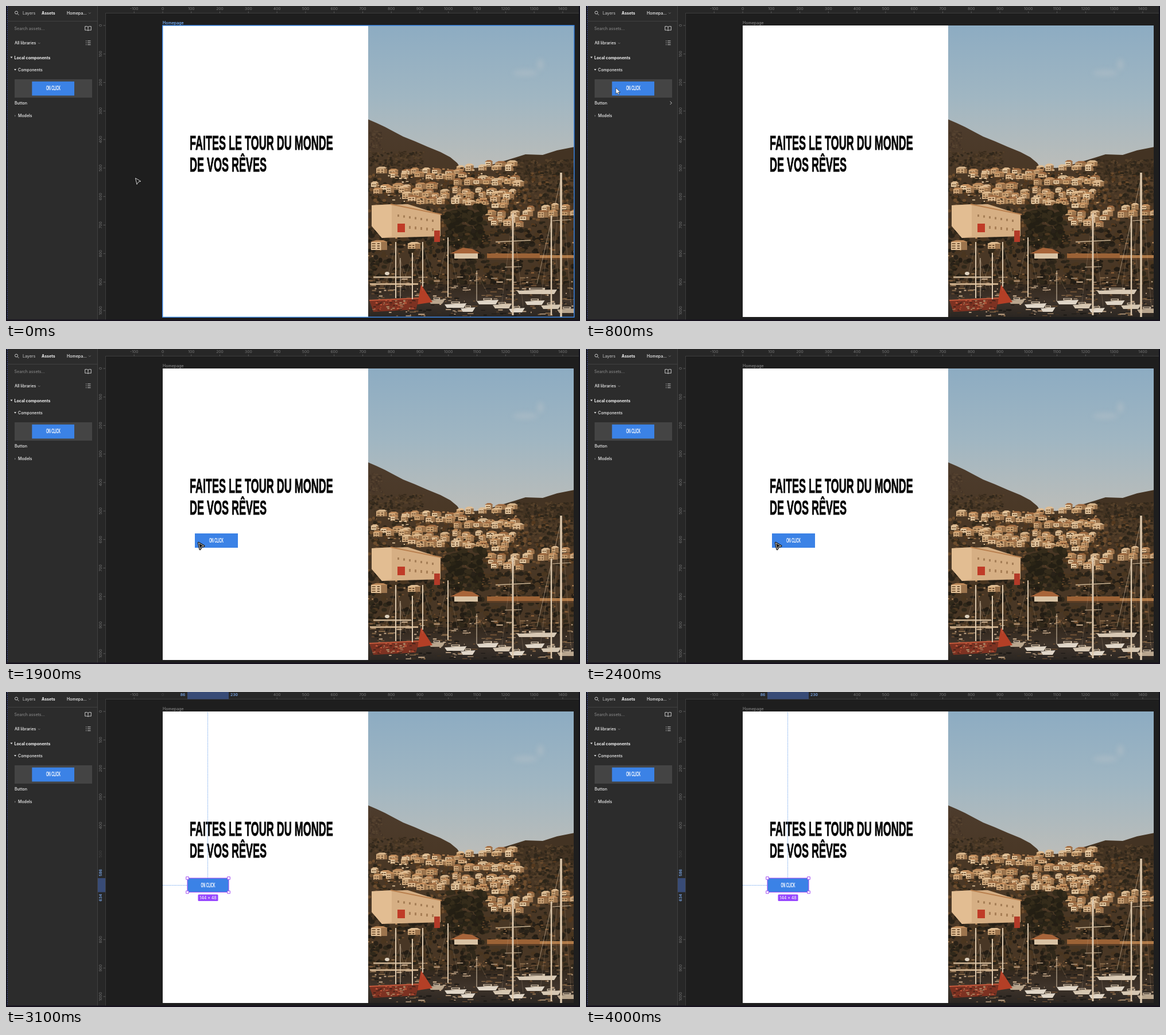
An HTML page with a canvas that plays this animation: 1000x550 px, repeating every 4300 ms.

```html
<!DOCTYPE html>
<html lang="fr">
<head>
<meta charset="utf-8">
<title>Homepage</title>
<style>
html, body { margin: 0; width: 100%; height: 100%; overflow: hidden; background: #1e1e1e; }
canvas, svg { position: absolute; left: 0; top: 0; }
canvas { left: 631px; top: 34px; }
text { font: 500 7px Inter, sans-serif; fill: #f4f4f4; }
.bold { font-weight: 700; }
.mute { fill: #808080; }
.ruler text { font-size: 6.7px; font-weight: 400; fill: #747474; text-anchor: middle; }
.ruler .hot { fill: #78a5e6; font-weight: 600; }
.ruler .dim { fill: #454545; }
.ruler path { stroke: #5a5a5a; }
.line { fill: none; stroke: #d8d8d8; stroke-width: .9; }
.title { font: 700 34.5px "Liberation Sans", Arial, sans-serif; fill: #050505; stroke: #050505; stroke-width: .9; }
.cta { font: 700 10.8px "Liberation Sans", Arial, sans-serif; fill: #fff; text-anchor: middle; }

.hover, .before, .after, .chev, .ghost, .cursor, .white, .dark { animation: 4.3s step-end infinite; }
.hover { animation-name: hover; }
.before { animation-name: before; }
.after { animation-name: after; }
.chev { animation-name: chev; }
.ghost { animation-name: ghost; }
.cursor { animation-name: cursor; }
.white { animation-name: white; }
.dark { animation-name: dark; }
@keyframes hover { 0% { opacity: 1 } 2.32%, to { opacity: 0 } }
@keyframes before { 0% { opacity: 1 } 67.43%, to { opacity: 0 } }
@keyframes after { 0% { opacity: 0 } 67.43%, to { opacity: 1 } }
@keyframes chev { 0% { opacity: 0 } 11.62% { opacity: 1 } 23.25%, to { opacity: 0 } }
@keyframes white { 0% { opacity: 0 } 4.65% { opacity: 1 } 25.58%, to { opacity: 0 } }
@keyframes dark { 0% { opacity: 1 } 4.65% { opacity: 0 } 25.58%, to { opacity: 1 } }
@keyframes ghost {
  0% { opacity: 0; transform: translate(45px, 132px) }
  23.25% { opacity: 1; transform: translate(62px, 146px) }
  25.58% { opacity: 1; transform: translate(152px, 226px) }
  27.9% { opacity: 1; transform: translate(250px, 307px); animation-timing-function: steps(3) }
  34.88% { opacity: 1; transform: translate(310px, 328px); animation-timing-function: steps(4) }
  44.18% { opacity: 1; transform: translate(329px, 322px); animation-timing-function: steps(6) }
  58.13% { opacity: 1; transform: translate(323px, 322px) }
  67.43%, to { opacity: 0; transform: translate(323px, 322px) }
}
@keyframes cursor {
  0% { opacity: 1; transform: translate(225px, 300px); animation-timing-function: steps(3) }
  6.97% { opacity: 1; transform: translate(128px, 214px); animation-timing-function: steps(5) }
  18.6% { opacity: 1; transform: translate(52px, 143px) }
  20.92% { opacity: 1; transform: translate(58px, 150px) }
  23.25% { opacity: 1; transform: translate(120px, 205px) }
  25.58% { opacity: 1; transform: translate(205px, 282px) }
  27.9% { opacity: 1; transform: translate(278px, 338px); animation-timing-function: steps(3) }
  34.88% { opacity: 1; transform: translate(322px, 350px); animation-timing-function: steps(4) }
  44.18% { opacity: 1; transform: translate(335px, 338px); animation-timing-function: steps(6) }
  58.13% { opacity: 1; transform: translate(329px, 338px) }
  67.43% { opacity: 1; transform: translate(328px, 338px) }
  69.76%, to { opacity: 0; transform: translate(328px, 338px) }
}
</style>
</head>
<body>
<canvas id="photo" width="358" height="509"></canvas>
<svg width="1000" height="550" viewBox="0 0 1000 550">
  <defs>
    <g id="label"><g transform="scale(.48 1)"><text class="cta">ON CLICK</text></g></g>
    <g id="btn">
      <rect width="75" height="25" fill="#3b82e6"/>
      <use href="#label" x="37.5" y="16.3"/>
    </g>
  </defs>

  <!-- page -->
  <rect x="273" y="34" width="358" height="509" fill="#fff"/>
  <g transform="translate(320 251.2) scale(.522 1)">
    <text class="title">FAITES LE TOUR DU MONDE</text>
    <text class="title" y="38">DE VOS RÊVES</text>
  </g>
  <text class="mute" x="273" y="32">Homepage</text>
  <g class="hover">
    <rect x="272.8" y="34" width="717" height="509.3" fill="none" stroke="#3f8df0" stroke-width="1.4"/>
    <text x="273" y="32" style="fill:#5b9df0">Homepage</text>
  </g>

  <!-- rulers -->
  <path d="M159 0H1000V12.5H173V550H159Z" fill="#272727"/>
  <path d="M173 12.5H1000M173.5 12V550" stroke="#3d3d3d" fill="none"/>
  <g class="ruler" id="rulers"></g>
  <g class="ruler after">
    <path d="M316 0h72v12.5h-72zM159.5 325h13.5v24.5h-13.5z" fill="#384b76" style="stroke:none"/>
    <text class="hot" x="308" y="6.5">86</text>
    <text class="hot" x="397.5" y="6.5">230</text>
    <text class="hot" transform="translate(166.5 315.5) rotate(-90)">586</text>
    <text class="hot" transform="translate(166.5 359) rotate(-90)">634</text>
    <text class="dim" x="273" y="6.5">0</text>
    <text class="dim" transform="translate(166.5 283) rotate(-90)">500</text>
  </g>

  <!-- sidebar -->
  <rect x="3" width="156" height="550" fill="#2c2c2c"/>
  <path d="M3 26.5H159M159.5 0V550" stroke="#414141"/>
  <g class="line">
    <circle cx="18" cy="11.5" r="2.5"/>
    <path d="M20 13.5l2.4 2.4M143 36.5q-2.5-1.8-5.3-.8v6.5q3-.8 5.3.8q2.3-1.6 5.3-.8v-6.5q-2.8-1-5.3.8v6.5"/>
    <path d="M139 61h1.3M142 61h5.5M139 64.3h1.3M142 64.3h5.5M139 67.6h1.3M142 67.6h5.5"/>
    <path d="M144 11.5l1.8 1.8 1.8-1.8M56 64l1.8 1.8 1.8-1.8" stroke="#777"/>
    <path class="chev" d="M146.500 166.500l2.800 2.800-2.800 2.800"/>
  </g>
  <path d="M7.500 88.500h4l-2 2.800zM14 110h4l-2 2.800z" fill="#ddd"/>
  <path d="M15 190l2 1.700-2 1.700z" fill="#777"/>
  <text x="29" y="15" style="fill:#b5b5b5">Layers</text>
  <text class="bold" x="62" y="15">Assets</text>
  <text x="106" y="15">Homepa...</text>
  <text class="mute" x="14.5" y="41.5">Search assets...</text>
  <text x="15" y="67">All libraries</text>
  <text class="bold" x="14.5" y="92.5">Local components</text>
  <text x="21" y="113.5">Components</text>
  <rect x="15" y="128" width="135" height="32" fill="#444"/>
  <rect x="45.3" y="131.8" width="73.7" height="24.6" fill="#3b82e6"/>
  <use href="#label" x="82.5" y="147.3"/>
  <text x="15" y="171.8">Button</text>
  <text x="21" y="194.3">Models</text>

  <!-- screen edges -->
  <path d="M0 0H2V550H0ZM998 0h2v550h-2z" fill="#11111a"/>
  <path d="M0 547.5H1000V550H0Z" fill="#17121e"/>
  <path d="M2.5 0V547" stroke="#4653a0" stroke-dasharray="2 1.5"/>

  <!-- dropped button -->
  <g class="after">
    <path d="M351.5 35V325M273 337.5H316" stroke="#76a9ee" stroke-dasharray="1.5 1.2"/>
    <rect x="316" y="325" width="72" height="24.5" fill="#3b82e6" stroke="#a24df0"/>
    <use href="#label" x="352" y="340.8"/>
    <path d="M313.7 322.7h4.6v4.6h-4.6zm72 0h4.6v4.6h-4.6zm0 24.5h4.6v4.6h-4.6zm-72 0h4.6v4.6h-4.6z" fill="#fff" stroke="#a24df0"/>
    <rect x="334.5" y="353.5" width="35" height="11.5" rx="1.5" fill="#9747ff"/>
    <text x="352" y="361.8" text-anchor="middle">144 × 48</text>
  </g>

  <g class="ghost"><use href="#btn"/></g>
  <g class="cursor">
    <path class="white" d="M0 0v10.500l2.500-2.300 1.700 3.700 1.800-.800-1.700-3.500h3.500z" fill="#fff" stroke="#222" stroke-width=".7"/>
    <g class="dark" stroke-linejoin="round">
      <path d="M.5.5L9.800 6 5.600 7.200 3 11.500Z" fill="none" stroke="#1a1a1a" stroke-width="3.400"/>
      <path d="M.5.5L9.800 6 5.600 7.200 3 11.500Z" fill="#181818" stroke="#d4d4d4"/>
    </g>
  </g>
</svg>
<script>
// Ruler ticks and numbers
const unit = 49.78;
let marks = '';
function mark(value, vertical, hidden) {
  const p = (vertical ? 34 : 273) + value / 100 * unit;
  const place = vertical ? `translate(166.5 ${p}) rotate(-90)` : `translate(${p} 6.5)`;
  const tick = vertical ? `M169.5 ${p}h3.5` : `M${p} 9.5v3`;
  marks += `<g class="${hidden ? 'before' : ''}"><path d="${tick}"/><text transform="${place}">${value}</text></g>`;
}
for (let v = -100; v <= 1400; v += 100) mark(v, false, v >= 0 && v <= 300);
for (let v = 0; v <= 1000; v += 100) mark(v, true, v >= 500 && v <= 700);
document.getElementById('rulers').innerHTML = marks;

// Harbour view, drawn in stage coordinates
const c = document.getElementById('photo').getContext('2d');
c.translate(-631, -34);
let seed = 11;
const rnd = (a = 0, b = 1) => {
  seed = (seed * 16807) % 2147483647;
  return a + (b - a) * seed / 2147483647;
};
const pick = list => list[Math.floor(rnd(0, list.length))];
const box = (x, y, w, h, color) => { c.fillStyle = color; c.fillRect(x, y, w, h); };
function poly(color, ...p) {
  c.fillStyle = color;
  c.beginPath();
  for (let i = 0; i < p.length; i += 2) c.lineTo(p[i], p[i + 1]);
  c.fill();
}
function rope(color, width, x1, y1, x2, y2) {
  c.strokeStyle = color;
  c.lineWidth = width;
  c.beginPath();
  c.moveTo(x1, y1);
  c.lineTo(x2, y2);
  c.stroke();
}
function blob(x, y, rx, ry, color) {
  c.fillStyle = color;
  c.beginPath();
  c.ellipse(x, y, rx, ry, 0, 0, 7);
  c.fill();
}
function bushes(n, x0, x1, y0, y1, r, colors) {
  while (n--) blob(rnd(x0, x1), rnd(y0, y1), rnd(r / 2, r), rnd(r / 3, r * .8), pick(colors));
}
function specks(n, x0, x1, y0, y1, w, colors) {
  while (n--) box(rnd(x0, x1), rnd(y0, y1), rnd(1, w), rnd(1, 2.5), pick(colors));
}
function fade(y0, y1, ...colors) {
  const g = c.createLinearGradient(0, y0, 0, y1);
  colors.forEach((k, i) => g.addColorStop(i / (colors.length - 1), k));
  return g;
}
// Sunlit front, shaded side, tiled roof and balcony lines
function house(x, y, w, h) {
  const front = w * rnd(.55, .75);
  box(x, y, front, h, pick(['#e3c096', '#d6ae80', '#ecd0a8', '#cfa473']));
  box(x + front, y, w - front, h, '#9c744d');
  poly(pick(['#a26c42', '#c28d5c', '#e0bd92']), x - 1, y, x + w * .3, y - 3, x + w * .75, y - 3, x + w + 1, y);
  for (let j = 2; j < h - 1; j += 4) {
    box(x + 1.5, y + j, front * .35, 2, '#80603f');
    box(x + front * .6, y + j, front * .25, 2, '#6d5035');
  }
}
function boat(x, y, w, hull) {
  poly(hull, x, y, x + w, y - 2, x + w - 5, y + 6, x + 4, y + 6);
  box(x + w * .3, y - 5, w * .4, 4, '#cbb9a2');
  box(x + w * .34, y - 4, w * .3, 1.5, '#40372f');
}

box(631, 34, 359, 300, fade(35, 285, '#8dacc2', '#a0b6c2', '#bcbdb9'));
c.filter = 'blur(4px)';
blob(905, 117, 22, 5, 'rgba(190,198,202,.4)');
blob(931, 102, 5, 10, 'rgba(190,198,202,.45)');
c.filter = 'none';

// hills
const earth = ['#30271b', '#443422', '#55402a', '#392c1d'];
poly('#433323', 790, 290, 850, 276, 886, 265, 905, 259, 935, 260, 960, 252, 990, 246, 990, 543, 790, 543);
poly(fade(198, 300, '#4d3c2d', '#493725'), 631, 198, 645, 204, 660, 211, 675, 219, 692, 228, 712, 236, 735, 246,
  757, 255, 774, 264, 786, 274, 792, 283, 880, 282, 990, 300, 990, 543, 631, 543);
bushes(200, 634, 730, 254, 285, 3, earth);
bushes(90, 634, 655, 218, 250, 2.5, ['#4a3829', '#564330', '#413225']);
bushes(520, 890, 992, 268, 345, 3.5, earth);
bushes(700, 631, 990, 290, 400, 4, ['#2b2418', '#54391f', '#6d4d2e', '#33291a']);

// town
const rows = [[273, 835, 885], [280, 785, 885], [286, 645, 800], [293, 670, 800], [300, 800, 890], [306, 780, 895],
  [312, 636, 745], [320, 640, 890], [328, 690, 880], [336, 700, 870], [344, 800, 880], [350, 908, 985],
  [360, 905, 985], [358, 835, 905], [367, 840, 905], [377, 845, 905]];
for (const [y, x0, x1] of rows) {
  for (let x = x0; x < x1; x += rnd(15, 25)) house(x, y + rnd(-3, 3), rnd(12, 20), rnd(6, 10));
}
specks(170, 640, 895, 280, 345, 5, ['#e6c79e', '#c99a68', '#b5804f', '#33271a']);
bushes(120, 765, 835, 350, 420, 8, ['#241f14', '#352c1b', '#2a2416']);
bushes(500, 631, 990, 392, 490, 6, ['#241d14', '#30281a', '#4a3620', '#292218']);
specks(130, 631, 990, 395, 480, 6, ['#8a5f38', '#6a492b', '#b88a5c', '#1d1812']);

// large building
poly('#d6af84', 637, 348, 700, 346, 757, 364, 757, 402, 655, 405, 637, 384);
poly('#e2bd92', 637, 348, 672, 346, 672, 402, 655, 405, 637, 384);
rope('#b9804f', 2, 670, 346, 759, 364);
for (let i = 0; i < 7; i++) {
  box(682 + i * 10, 364 + i * 1.5, 3, 4, '#a57e56');
  box(682 + i * 10, 382 + i, 3, 5, '#a87f56');
}
box(682, 380, 13, 15, '#c03b27');
box(746, 392, 10, 20, '#b33a28');
house(636, 412, 28, 14);
house(700, 415, 22, 9);
box(781, 430, 41, 11, '#d9c3a5');
poly('#a8653a', 774, 432, 796, 422, 812, 424, 826, 432);
box(838, 432, 92, 8, '#9b6236');
box(838, 440, 150, 3, '#5a3d25');
box(930, 435, 60, 5, '#b07a48');

// harbour
box(631, 486, 359, 57, fade(486, 543, '#33281d', '#3f342b', '#2b2622'));
specks(380, 631, 990, 472, 541, 12, ['#8b6c4b', '#1d1a16', '#c2a688', '#6a4d33', '#3a2d20']);
for (let i = 0; i < 9; i++) boat(736 + i * 28, 514 + (i * 7) % 20, rnd(22, 40), pick(['#d6c7b2', '#b9a68e', '#e0d6c8']));
boat(890, 497, 70, '#d8c9b5');
box(640, 472, 66, 3, '#b9a183');
box(634, 484, 84, 3, '#c8ab88');
poly('#7d3222', 633, 514, 720, 510, 714, 530, 640, 534);
rope('#c65a3c', 2, 633, 514, 720, 510);
specks(60, 635, 712, 513, 530, 6, ['#c65a3c', '#4a241a', '#a98260']);
poly('#b43f26', 723, 486, 717, 521, 743, 517);
blob(664, 467, 4, 3, '#e0d3c0');

// masts: x, top, bottom, thickness
const masts = [[679, 412, 510, 2], [687, 440, 510, 1], [708, 431, 512, 2], [726, 412, 490, 2], [770, 404, 508, 2],
  [820, 462, 515, 1], [883, 362, 540, 3], [950, 366, 540, 2.5], [967, 291, 543, 3.5]];
for (const [x, top, bottom, w] of masts) {
  rope('rgba(205,180,150,.4)', .6, x, top + 4, x - 20, bottom - 15);
  rope('rgba(205,180,150,.4)', .6, x, top + 4, x + 18, bottom - 15);
  rope('#ddc9ae', w, x, top, x, bottom);
}
rope('#cdb595', 1.4, 853, 412, 914, 409);
rope('#cdb595', 1.2, 869, 456, 898, 455);
rope('#cdb595', 1.2, 952, 375, 984, 373);
rope('rgba(215,190,160,.6)', 1, 967, 300, 925, 485);
</script>
</body>
</html>
```
